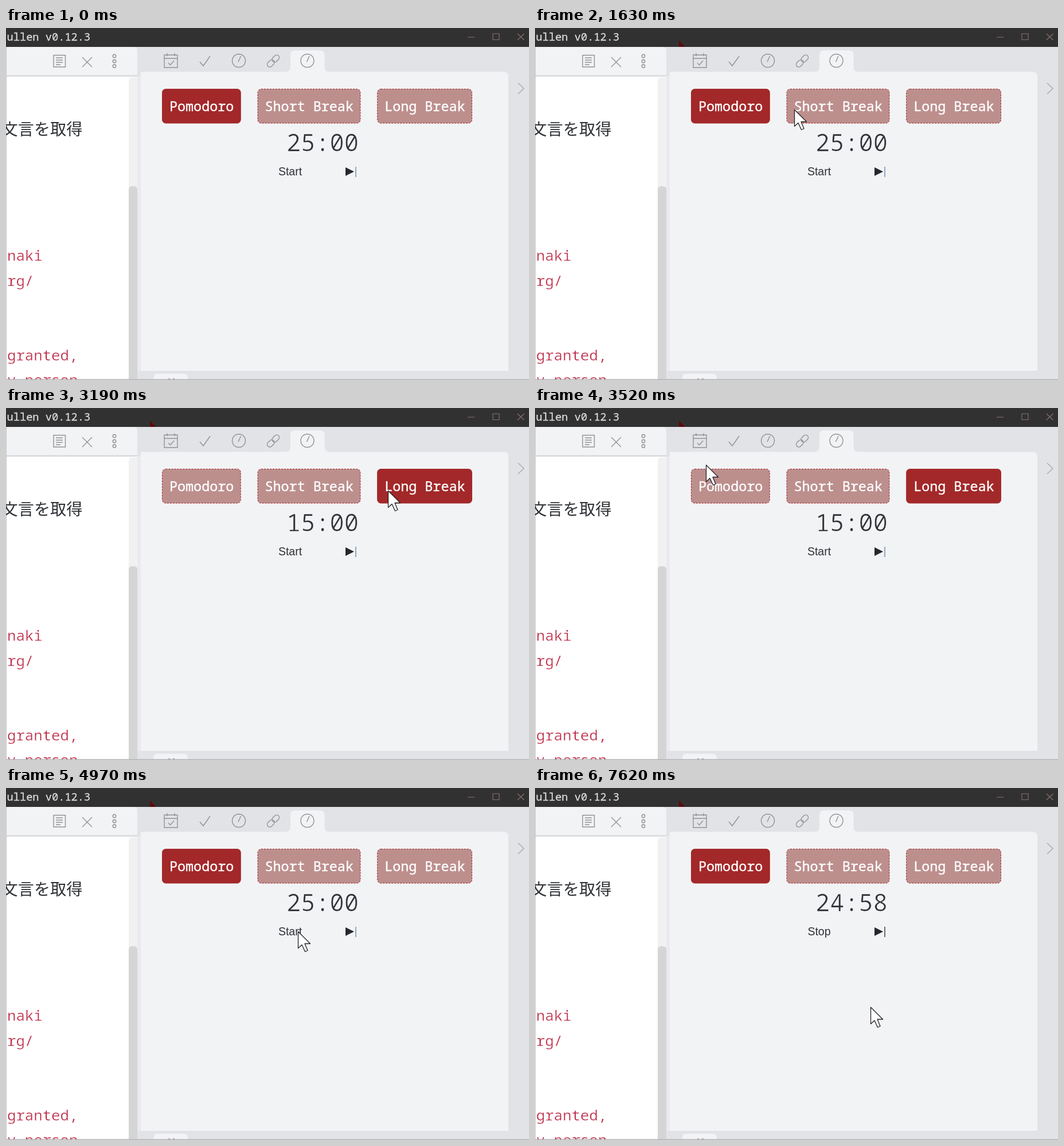
Recreate the animation shown at these times as an HTML page. Size 912x614 px, loop 8 s.

```html
<!DOCTYPE html>
<html lang="en">
<head>
<meta charset="utf-8">
<title>Pomodoro timer</title>
<style>
  html, body { margin: 0; width: 100%; height: 100%; overflow: hidden; }
  svg { display: block; width: 912px; height: 614px; }
  text { white-space: pre; fill: #2e3136; }
  .mono { font-family: "Noto Sans Mono", monospace; }
  .title { font-size: 18.7px; fill: #dcdcdc; stroke: #dcdcdc; stroke-width: .3; }
  .code { font-size: 25.7px; fill: #bd2440; stroke: #fff; stroke-width: .4; }
  .time { font-size: 42px; stroke: #f2f3f5; stroke-width: .7; }
  .jp { font: 28.2px "Noto Sans CJK JP", "Noto Sans CJK", sans-serif; }
  .control { font: 19.5px "Liberation Sans", Arial, sans-serif; text-anchor: middle; }
  .mode rect { fill: #bc8f8d; stroke: #9c1e20; stroke-dasharray: 3 2; }
  .mode.active rect { fill: #a32829; stroke: #a32829; stroke-dasharray: none; }
  .mode text { fill: #fff; stroke: #fff; stroke-width: .4; font-size: 23.4px; }
  .icon { fill: none; stroke: #929295; stroke-width: 1.4; }
  .window { fill: none; stroke: #87736f; stroke-width: 1.1; }
</style>
</head>
<body>
<svg viewBox="0 0 912 614">
  <defs>
    <g id="clock"><circle r="11.5"/><path d="M3.5-8L-1 2"/></g>
  </defs>

  <!-- side panel and tab strip -->
  <rect width="912" height="614" fill="#e2e3e7"/>
  <rect x="229" y="84" width="6" height="514" fill="#e9eaed"/>
  <path fill="#f2f3f5" d="M235 598V76.500H488Q496 76 496 68V47Q496 39 504 39H547Q555.500 39 555.500 47V68Q555.500 76.500 564 76.500H868Q876 76.500 876 84V598Z"/>
  <path fill="#f2f3f5" d="M257 614V610Q257 603 264 603H310Q317 603 317 610V614Z"/>
  <path class="icon" d="M283 612h3M291 612h3"/>

  <!-- note pane -->
  <path fill="#fff" d="M0 84H229V614H0Z"/>
  <path fill="#f2f3f5" d="M0 33H222Q229 33 229 40V83H0Z"/>
  <path fill="#dcdde2" d="M0 82H229V85H0Z"/>
  <path fill="#f1f1f2" d="M214 614V92Q214 86 220 86H229V614Z"/>
  <path fill="#d5d5d6" d="M214 614V282Q214 276 220 276H223Q229 276 229 282V614Z"/>
  <path fill="#c4c4c7" d="M0 33h1V614H0Z"/>
  <text class="jp" x="-7.500" y="187">文言を取得</text>
  <g class="mono">
    <text class="code" x="2" y="406">naki</text>
    <text class="code" x="2" y="450">rg/</text>
    <text class="code" x="2" y="580">granted,</text>
    <text class="code" x="2" y="623">y person</text>
  </g>
  <path fill="#b5b5b9" d="M0 612.500H912V614H0Z"/>

  <!-- title bar -->
  <rect width="912" height="33" fill="#323131"/>
  <text class="mono title" x="1.500" y="22">ullen v0.12.3</text>
  <path class="window" d="M805 16H817M849 10H860V20.500H849ZM892 10L903.500 21M903.500 10L892 21"/>
  <path id="residue" fill="#5c0a0c" d="M251 22L262 33H251Z"/>

  <!-- icons -->
  <g class="icon">
    <path d="M83 47.500H103.500V68H83ZM87 52H99M87 56H99M87 60H99M87 64H95"/>
    <path d="M133 51L150 68M150 51L133 68"/>
    <circle cx="189" cy="49" r="2.700"/><circle cx="189" cy="58" r="2.700"/><circle cx="189" cy="66.500" r="2.700"/>
    <path d="M276 47H299V69H276ZM276 53H299M281 44V49M294 44V49M283 61L286.500 64.500L293 57"/>
    <path d="M338 59L344 66L356 49"/>
    <use href="#clock" x="406" y="57"/>
    <g transform="translate(466 57.500) rotate(-45)">
      <rect x="-13" y="-4.500" width="14" height="9" rx="4.500"/>
      <rect x="-1" y="-4.500" width="14" height="9" rx="4.500"/>
    </g>
    <use href="#clock" x="525.500" y="57"/>
    <path stroke="#aaaaad" d="M893 96L903 105.500L893 115"/>
  </g>

  <!-- timer -->
  <g id="modes" class="mono"></g>
  <text id="time" class="mono time" x="489" y="214.500"></text>
  <text id="toggle" class="control" x="495.500" y="256.500"></text>
  <path fill="#24272c" d="M592 243L607 250.500L592 258Z"/>
  <path id="bar" d="M610 242V260" stroke-width="1.500"/>

  <path id="cursor" fill="#fff" stroke="#222" stroke-width="1.300" stroke-linejoin="round"
        d="M.5 .5V29.500L7 23.500L12.500 35.500L17 33.500L12 21.500H21.500Z"/>
</svg>
<script>
  const LOOP = 8000, ENTER = 310, RUN = 5570, FIRST_SECOND = 5640, SECOND = 990;
  const byId = id => document.getElementById(id);
  const [residue, time, toggle, bar, cursor] = ["residue", "time", "toggle", "bar", "cursor"].map(byId);

  const modes = [["Pomodoro", 25], ["Short Break", 5], ["Long Break", 15]];
  const clicks = [[0, 0], [2240, 1], [3190, 2], [4150, 0]]; // time, mode

  // Pointer glides: start, duration, destination
  const glides = [
    [310, 140, 744, 577], [600, 470, 219, 8], [1070, 350, 357, 126], [1420, 350, 502, 151],
    [2000, 240, 504, 144], [2580, 410, 666, 144], [3190, 390, 300 - 26, 96], [3600, 420, 366, 129],
    [4340, 500, 518, 254], [4840, 270, 499, 245], [5770, 140, 585, 382]
  ];

  // Buttons sit in a row, each as wide as its label plus padding
  let left = 272;
  const buttons = modes.map(([label]) => {
    const width = label.length * 14.05 + 25.3;
    byId("modes").insertAdjacentHTML("beforeend",
      `<g class="mode"><rect x="${left + .5}" y="106.5" width="${width - 1}" height="59.5" rx="6"/>` +
      `<text x="${left + 13}" y="145">${label}</text></g>`);
    left += width + 28.8;
    return byId("modes").lastElementChild;
  });

  const ease = p => p * p * (3 - 2 * p);
  const twoDigits = n => String(n).padStart(2, "0");

  function pointerAt(t) {
    let x = 836, y = 597;
    for (const [start, duration, toX, toY] of glides) {
      const k = ease(Math.min(1, Math.max(0, (t - start) / duration)));
      x += (toX - x) * k;
      y += (toY - y) * k;
    }
    return [Math.round(x), Math.round(y)];
  }

  function draw() {
    const t = performance.now() % LOOP;
    const mode = clicks.findLast(([at]) => at <= t)[1];
    const elapsed = Math.max(0, Math.floor((t - FIRST_SECOND) / SECOND));
    const left = modes[mode][1] * 60 - elapsed;
    const running = t >= RUN;

    buttons.forEach((button, i) => button.classList.toggle("active", i === mode));
    time.textContent = `${twoDigits(Math.floor(left / 60))}:${twoDigits(left % 60)}`;
    toggle.textContent = running ? "Stop" : "Start";
    bar.setAttribute("stroke", running ? "#3c3f44" : "#6f8fab");
    residue.style.display = t < 1070 ? "none" : "";
    cursor.style.display = t < ENTER ? "none" : "";
    cursor.setAttribute("transform", `translate(${pointerAt(t)})`);
    requestAnimationFrame(draw);
  }
  draw();
</script>
</body>
</html>
```
